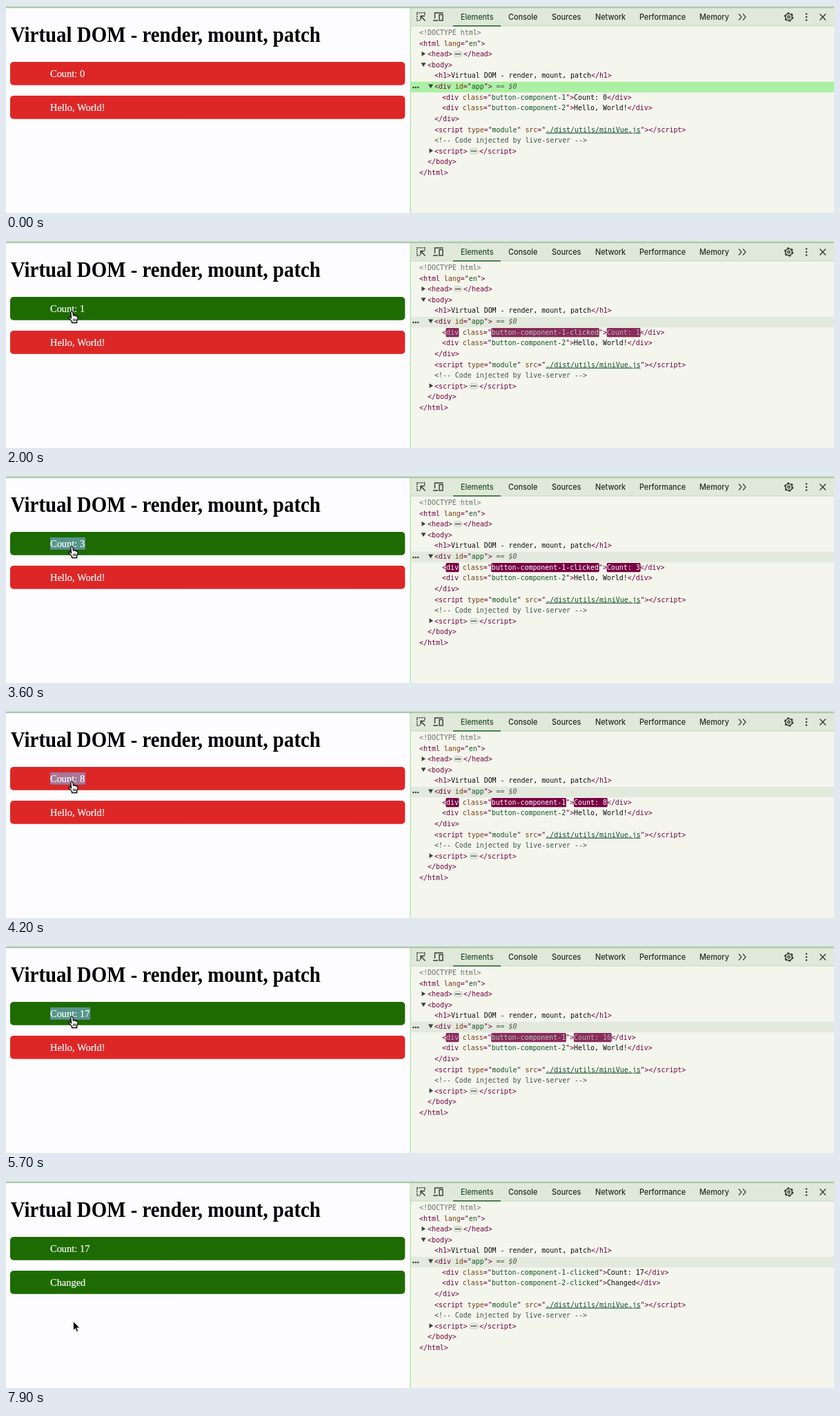
Animation, 1200 px wide and 300 px high, one loop 8000 ms. Source, as an HTML page:

```html
<!DOCTYPE html>
<html lang="en">
<head>
<meta charset="utf-8">
<title>Virtual DOM</title>
<style>
html, body { margin: 0; width: 100%; height: 100%; overflow: hidden; background: #fdfcfe; }
svg { display: block; width: 1200px; height: 300px; }
text { white-space: pre; }
.page { font: 16px "Liberation Serif", Times, serif; fill: #fff; stroke: #fff; stroke-width: .2; }
.head { font: bold 32px "Liberation Serif", Times, serif; fill: #000; }
.tab { font: 500 12px Inter, sans-serif; fill: #262e26; }
.tab.on { fill: #20522a; }
.code { font: 11px "DejaVu Sans Mono", monospace; fill: #0c0c0c; }
.t { fill: #73003f; }
.n { fill: #783a08; }
.v { fill: #0f4f22; }
.doc { fill: #6b7169; }
.com { fill: #3f5249; }
.dim { fill: #525c51; font-style: italic; }
.u { text-decoration: underline; }
.icon { fill: none; stroke: #343c34; stroke-width: 1.4; }
</style>
</head>
<body>
<svg viewBox="0 0 1200 300">
  <rect width="1200" height="300" fill="#fdfcfe"/>
  <rect x="586" width="614" height="300" fill="#f4f6ee"/>
  <rect x="587" y="3" width="613" height="26" fill="#e0e8d9"/>
  <rect x="587" y="28.5" width="613" height="1" fill="#c4dcbf"/>
  <rect width="1200" height="2" fill="#c2dcc0"/>
  <rect y="2" width="1200" height="1" fill="#93b998"/>
  <rect x="585.5" y="3" width="1.5" height="297" fill="#b4e6af"/>
  <rect x="648" y="28" width="69" height="1.6" fill="#2b6a30"/>
  <g class="icon">
    <path d="M607 13V9.7H595.7V21H600" stroke-dasharray="2 1.2"/>
    <path d="M601 14.5L607.5 21.5M601 20V14.5H607"/>
    <path d="M621.5 18V10H633.5M619 21H626"/>
    <rect x="628" y="12.5" width="5" height="8.5"/>
    <path d="M1062 11.5L1066 16L1062 20.5M1068 11.5L1072 16L1068 20.5" stroke-width="1.2"/>
    <circle cx="1134.5" cy="16" r="4.8" stroke-width="1.6"/>
    <circle cx="1134.5" cy="16" r="6" stroke-width="1.6" stroke-dasharray="3 3.28"/>
    <circle cx="1134.5" cy="16" r="1.7"/>
    <path d="M1179.5 11.5L1188 20.5M1188 11.5L1179.5 20.5"/>
  </g>
  <g fill="#343c34">
    <circle cx="1160" cy="11.5" r="1.3"/><circle cx="1160" cy="16" r="1.3"/><circle cx="1160" cy="20.5" r="1.3"/>
  </g>
  <rect id="selected" x="587" y="109.7" width="613" height="15.6"/>
  <g id="fixed"></g>
  <g id="live"></g>
</svg>
<script>
const LOOP = 8000, STEP = 100, LAG = 100, FLASH = 1400;
const SX = 0.903, SY = 0.976;
const CELL = 11 * 0.602 * SX;
const clicks = [1700, 3300, 3500, 3700, 3800, 3900, 4000, 4100, 4300,
  4400, 4600, 4700, 4900, 5000, 5200, 5400, 5700];
const secondClick = 6300;

// time, x, y of the pointer tip
const path = [[300, 330, 310], [1000, 95.5, 102], [5700, 95.5, 102],
  [6200, 100.5, 148], [6400, 100.5, 152], [6600, 100.5, 163], [7100, 97.5, 203.5]];

// flash age 0..1, background r g b, opacity
const flashStops = [[0, 120, 0, 66, 1], [0.14, 138, 42, 92, 1], [0.57, 143, 148, 140, 1],
  [0.79, 208, 219, 207, 1], [1, 226, 234, 224, 0]];
const tagRGB = [115, 0, 63], valueRGB = [15, 79, 34], textRGB = [12, 12, 12];

const $ = id => document.getElementById(id);
const esc = s => s.replace(/&/g, '&amp;').replace(/</g, '&lt;');
const mix = (a, b, k) => a.map((v, i) => v + (b[i] - v) * k);
const rgb = c => `rgb(${c.slice(0, 3).map(Math.round)})`;

function along(keys, t, ease = k => k) {
  if (t <= keys[0][0]) return keys[0].slice(1);
  for (let i = 1; i < keys.length; i++) {
    const [a, b] = [keys[i - 1], keys[i]];
    if (t <= b[0]) return mix(a.slice(1), b.slice(1), ease((t - a[0]) / (b[0] - a[0])));
  }
  return keys[keys.length - 1].slice(1);
}

const label = (x, y, cls, body) =>
  `<text class="${cls}" transform="translate(${x} ${y}) scale(${SX} ${SY})">${body}</text>`;
const tok = (cls, s, fill) =>
  `<tspan class="${cls}"${fill ? ` style="fill:${fill}"` : ''}>${esc(s)}</tspan>`;
const attr = (name, value, cls = 'v') =>
  tok('n', ' ' + name) + tok('t', '="') + tok(cls, value) + tok('t', '"');
const rowY = i => 42 + 15.62 * i;
const line = (i, x, body) => label(x, rowY(i), 'code', body);

const arrow = (x, i, open) => {
  const y = rowY(i) - 4;
  const d = open ? `M${x - 3.5} ${y - 2.5}h7l-3.5 6z` : `M${x - 2.5} ${y - 3.5}v7l5.5 -3.5z`;
  return `<path d="${d}" fill="#3a423a"/>`;
};
const dots = (x, y, gap, r) => [-gap, 0, gap].map(d =>
  `<circle cx="${x + d}" cy="${y}" r="${r}" fill="#303830"/>`).join('');
const pill = (x, i) => {
  const y = rowY(i) - 3.6;
  return `<rect x="${x}" y="${y - 4}" width="12" height="8" rx="3.5" fill="#e6ece0" stroke="#bcc8b8" stroke-width=".8"/>`
    + dots(x + 6, y, 2.8, 1.05);
};

function drawFixed() {
  const tabs = [['Elements', 659], ['Console', 728], ['Sources', 791],
    ['Network', 854], ['Performance', 918], ['Memory', 1005]];
  $('fixed').innerHTML = [
    label(6.8, 52, 'head', 'Virtual DOM - render, mount, patch'),
    ...tabs.map(([s, x], i) => label(x, 20, i ? 'tab' : 'tab on', s)),
    line(0, 599, tok('doc', '<!DOCTYPE html>')),
    line(1, 599, tok('t', '<html') + attr('lang', 'en') + tok('t', '>')),
    arrow(605, 2), line(2, 611, tok('t', '<head>')), pill(649, 2), line(2, 663, tok('t', '</head>')),
    arrow(605, 3, true), line(3, 611, tok('t', '<body>')),
    line(4, 621, tok('t', '<h1>') + 'Virtual DOM - render, mount, patch' + tok('t', '</h1>')),
    dots(593.8, 118, 3.4, 1.2), arrow(615.5, 5, true),
    line(5, 621, tok('t', '<div') + attr('id', 'app') + tok('t', '>') + tok('dim', ' == $0')),
    line(8, 621, tok('t', '</div>')),
    line(9, 621, tok('t', '<script') + attr('type', 'module')
      + attr('src', './dist/utils/miniVue.js', 'v u') + tok('t', '></' + 'script>')),
    line(10, 621, tok('com', '<!-- Code injected by live-server -->')),
    arrow(616, 11), line(11, 621, tok('t', '<script>')), pill(672, 11),
    line(11, 686, tok('t', '</' + 'script>')),
    line(12, 611, tok('t', '</body>')),
    line(13, 599, tok('t', '</html>'))
  ].join('');
}

function button(y, on, text, picked) {
  let s = `<rect x="6" y="${y}" width="572.3" height="33.7" rx="5" fill="${on ? '#1e6b02' : '#dd2727'}"/>`;
  if (picked) {
    const w = 51 + 7.2 * (text.length - 8);
    s += `<rect x="64" y="${y + 8}" width="${w}" height="18" fill="rgba(128,180,235,.58)"/>`
      + `<path d="M64 ${y + 25.5}h${w}" stroke="#5a5c9c" stroke-dasharray="1 1"/>`;
  }
  return s + label(64, y + 21.6, 'page', text);
}

// One <div> line of the tree; changed parts flash and fade.
function node(i, cls, text, age) {
  const u = age / FLASH, lit = u >= 0 && u < 1;
  const ink = base => lit ? rgb(mix([255, 255, 255], base, Math.min(1, u / 0.45))) : rgb(base);
  let s = '';
  if (lit) {
    const c = along(flashStops, u);
    const cells = [[1, 3], [12, cls.length], [14 + cls.length, text.length]];
    s = cells.map(([at, n]) =>
      `<rect x="${632 + at * CELL - 0.5}" y="${rowY(i) - 9.7}" width="${n * CELL + 1}" height="13.2" rx="1.5" fill="${rgb(c)}" fill-opacity="${c[3]}"/>`).join('');
  }
  return s + line(i, 632, tok('t', '<') + tok('t', 'div', ink(tagRGB)) + tok('n', ' class')
    + tok('t', '="') + tok('v', cls, ink(valueRGB)) + tok('t', '">')
    + tok('', text, ink(textRGB)) + tok('t', '</div>'));
}

function pointer(t) {
  if (t < path[0][0]) return '';
  const [x, y] = along(path, t, k => k * k * (3 - 2 * k));
  const hand = x > 6 && x < 578 && (y > 81 && y < 114.5 || y > 130 && y < 164);
  const shape = hand
    ? '<path d="M-1.6 1.2C-1.6-.6 1.2-.6 1.4 1.2L2 6C3 5 4.4 5.3 4.6 6.5C5.6 5.8 6.6 6.2 6.8 7.2C7.8 6.8 8.6 7.4 8.6 8.6C8.6 11 8 12.5 7.2 14V16.5H0V14.5C-1.5 13-3 11-4.6 9.2C-4.4 7.4-2.6 7.6-1 9.6Z" fill="#fff" stroke="#000" stroke-width="1.3"/><path d="M2.2 10.5V14M4 10.5V14M5.8 10.5V14" stroke="#000" stroke-width=".9"/>'
    : '<path d="M0 0V13L3 10.2L5 15L7.2 14L5.2 9.4H9.4Z" fill="#000" stroke="#fff" stroke-width=".8"/>';
  return `<g transform="translate(${x} ${y})">${shape}</g>`;
}

function draw(t) {
  const countAt = time => clicks.filter(c => c <= time).length;
  const shown = countAt(t), seen = countAt(t - LAG);
  const changed = t >= secondClick, noted = t >= secondClick + LAG;
  const age = seen ? t - LAG - clicks[seen - 1] : -1;
  $('selected').setAttribute('fill', shown ? '#e3e9dd' : '#abf0a4');
  $('live').innerHTML =
    button(81, shown % 2, 'Count: ' + shown, shown > 2 && !changed)
    + button(130, changed, changed ? 'Changed' : 'Hello, World!')
    + node(6, 'button-component-1' + (seen % 2 ? '-clicked' : ''), 'Count: ' + seen, age)
    + node(7, 'button-component-2' + (noted ? '-clicked' : ''), noted ? 'Changed' : 'Hello, World!',
      t - secondClick - LAG)
    + pointer(t);
}

const start = performance.now();
let last = -1;
function tick() {
  const t = Math.floor(((performance.now() - start) % LOOP + 0.01) / STEP) * STEP % LOOP;
  if (t !== last) draw(last = t);
  requestAnimationFrame(tick);
}
drawFixed();
tick();
</script>
</body>
</html>
```
